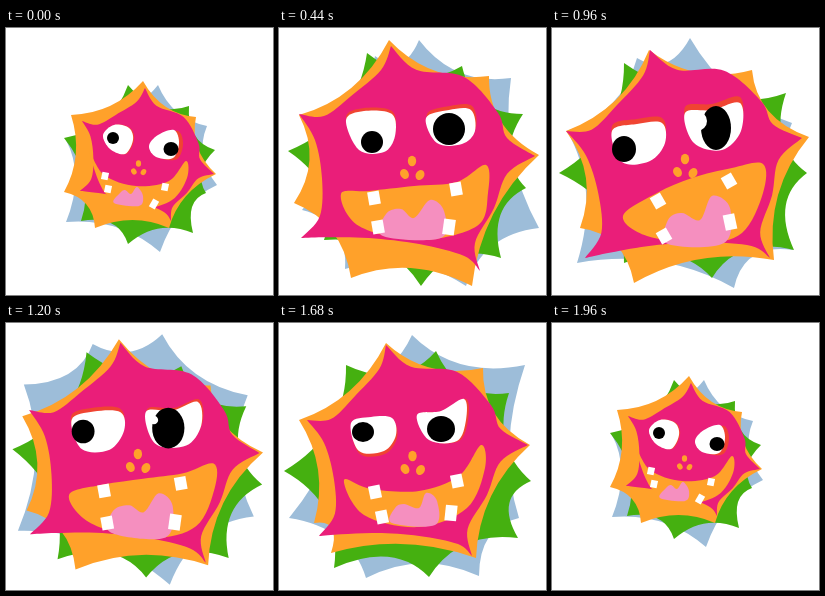
These frames come from a looping animation (267x267 px, 2 s). An HTML page:

```html
<!DOCTYPE html>
<html lang="en">
<head>
<meta charset="utf-8">
<title>Spiky monster</title>
<style>
  html, body { margin: 0; width: 100%; height: 100%; overflow: hidden; background: #fff; }
  svg { display: block; width: 100vw; height: 100vh; }
</style>
</head>
<body>
<svg id="stage" viewBox="0 0 267 267"></svg>
<script>
const LOOP = 2000, STEP = 40;
const RED = '#f04432', ORANGE = '#ffa12a', PINK = '#ea1e79';

// Spike tips run clockwise. pupil: x, y, rx, ry; glint: x, y, r; lids: two offsets;
// nose: x, y, size; teeth: four centres; bite: tooth size, tilt.
const small = {
  blue: [110,75, 152,57, 201,98, 211,157, 154,224, 60,194, 60,112],
  green: [122,57, 183,78, 209,122, 200,165, 187,205, 122,216, 75,193, 58,110],
  orange: [137,53, 190,89, 210,146, 163,200, 89,200, 58,164, 65,87],
  body: [139,60, 208,146, 165,193, 74,163, 76,93],
  eyeL: [97,107, 108,97, 123,100, 127,112, 119,126, 104,121],
  eyeR: [143,118, 152,107, 168,102, 173,115, 167,130, 150,129],
  pupilL: [107,110, 6,6], pupilR: [165,121, 7.5,7], glint: [160,118, 0], lids: [1,0, 4,1],
  nose: [132.5,141, .62], mouth: [83,122, 98,147, 130,158, 163,153, 180,133, 181,150, 166,172, 135,180, 100,166],
  teeth: [99,148, 159,159, 102,161, 148,176], bite: [7.5, 12],
  tongue: [108,175, 114,165, 119,162, 125,166, 131,159, 137,168, 133,178]
};
const laugh = {
  blue: [96,28, 140,12, 232,50, 260,200, 187,258, 66,241, 23,182],
  green: [88,25, 183,38, 244,86, 247,160, 222,230, 142,258, 45,212, 9,123],
  orange: [110,12, 210,48, 260,127, 193,258, 72,250, 15,175, 20,87],
  body: [112,18, 256,128, 201,243, 22,210, 20,86],
  eyeL: [67,92, 85,83, 113,86, 116,108, 105,124, 80,122],
  eyeR: [147,90, 170,82, 192,82, 196,103, 183,116, 158,115],
  pupilL: [93,114, 11,11], pupilR: [170,101, 16,16], glint: [155,97, 0], lids: [0,-3, 1,-4],
  nose: [133,142, 1], mouth: [62,166, 90,163, 135,158, 178,154, 207,137, 209,165, 198,198, 140,212, 80,198],
  teeth: [95,170, 177,161, 99,199, 170,199], bite: [13, -10],
  tongue: [104,208, 107,186, 122,181, 135,190, 151,172, 165,183, 162,210]
};
const scowl = {
  blue: [40,73, 162,15, 242,72, 240,180, 155,263, 10,195, 30,140],
  green: [105,22, 190,36, 247,98, 240,160, 206,244, 127,255, 50,212, 10,110],
  orange: [123,12, 215,70, 260,142, 193,255, 53,240, 12,151, 30,72],
  body: [128,16, 257,142, 190,248, 9,201, 25,72],
  eyeL: [69,84, 90,80, 119,85, 119,108, 105,123, 78,118],
  eyeR: [147,90, 172,92, 197,88, 200,105, 186,125, 156,121],
  pupilL: [88,112, 12,12], pupilR: [170,104, 14,20], glint: [154,97, 6], lids: [1,-4, 8,-5],
  nose: [131,141, 1], mouth: [58,167, 92,157, 140,154, 180,155, 208,153, 202,175, 190,208, 140,217, 80,200],
  teeth: [95,163, 172,164, 97,199, 161,205], bite: [13, 8],
  tongue: [97,210, 101,188, 118,182, 133,190, 146,173, 165,186, 158,218]
};
const growl = {
  blue: [85,30, 138,10, 240,95, 241,222, 182,260, 25,235, 15,103],
  green: [72,35, 160,50, 234,65, 255,145, 242,222, 160,250, 72,235, 7,145],
  orange: [97,22, 200,42, 257,109, 222,232, 82,255, 28,200, 14,103],
  body: [98,22, 250,110, 218,230, 33,230, 14,103],
  eyeL: [60,103, 85,96, 110,95, 113,115, 98,133, 70,134],
  eyeR: [133,85, 160,82, 188,75, 189,103, 170,122, 142,115],
  pupilL: [72,121, 12,13], pupilR: [164,100, 15,22], glint: [145,93, 10], lids: [0,-5, 0,-6],
  nose: [133,140, 1], mouth: [71,188, 105,165, 140,150, 180,140, 211,136, 211,165, 190,205, 150,215, 95,208],
  teeth: [106,173, 177,153, 112,208, 178,194], bite: [13, -30],
  tongue: [116,216, 116,192, 130,185, 148,192, 160,168, 178,180, 172,215]
};
const grin = {
  blue: [88,14, 170,12, 243,55, 253,172, 150,263, 2,187, 20,30],
  green: [87,25, 187,38, 245,97, 257,174, 208,245, 125,258, 36,237, 6,112],
  orange: [125,12, 208,78, 257,145, 187,250, 60,240, 15,178, 18,86],
  body: [127,18, 256,145, 186,247, 17,197, 30,75],
  eyeL: [70,92, 90,83, 118,85, 122,102, 108,122, 80,120],
  eyeR: [145,92, 172,92, 195,82, 200,102, 188,123, 155,125],
  pupilL: [81,99, 11,11], pupilR: [161,109, 17,19], glint: [150,100, 0], lids: [-1,-3, 2,0],
  nose: [131,140, 1], mouth: [57,160, 92,159, 135,160, 175,158, 205,144, 207,165, 190,202, 140,215, 78,195],
  teeth: [92,164, 173,166, 93,194, 162,203], bite: [13, 5],
  tongue: [97,205, 100,185, 118,180, 130,187, 147,172, 158,185, 150,214]
};
const smirk = {
  blue: [70,50, 133,12, 246,42, 240,195, 200,253, 87,255, 10,195],
  green: [67,42, 157,28, 230,70, 252,158, 239,215, 150,254, 55,245, 5,148],
  orange: [107,20, 204,45, 251,122, 197,235, 52,230, 35,200, 20,97],
  body: [107,22, 249,122, 193,233, 40,213, 28,97],
  eyeL: [72,100, 92,94, 113,95, 117,112, 105,128, 80,128],
  eyeR: [138,92, 162,88, 185,76, 187,97, 178,118, 150,117],
  pupilL: [84,109, 11,10], pupilR: [162,106, 14,13], glint: [150,100, 0], lids: [1,3, 2,0],
  nose: [133.5,142, 1], mouth: [65,157, 92,166, 140,168, 180,153, 202,122, 206,145, 188,185, 140,204, 85,192],
  teeth: [96,169, 178,158, 103,194, 172,190], bite: [13, -12],
  tongue: [113,200, 116,185, 125,181, 140,185, 147,170, 158,178, 156,202]
};

const smooth = u => u * u * (3 - 2 * u);
const easeOut = u => 1 - (1 - u) ** 2.5;
const easeIn = u => u ** 1.6;
const keys = [
  { at: 0, pose: small, ease: easeOut },
  { at: 440, pose: laugh, ease: smooth },
  { at: 680, pose: scowl, ease: smooth },
  { at: 960, pose: growl, ease: smooth },
  { at: 1400, pose: grin, ease: smooth },
  { at: 1680, pose: smirk, ease: easeIn },
  { at: 1960, pose: small, ease: smooth },
  { at: LOOP, pose: small }
];

// Inner outline of each body side: position along the side, outward bulge.
const sides = [
  [[.19, -.02], [.424, .109], [.694, .065], [.817, -.015]],
  [[.22, -.137], [.507, -.114], [.82, -.13]],
  [[.1, -.065], [.356, -.085], [.633, -.068], [.86, -.03]],
  [[.175, -.155], [.48, -.177], [.787, -.126]],
  [[.165, -.144], [.46, -.144], [.805, -.117]]
];

const stage = document.getElementById('stage');
function add(tag, fill) {
  const node = document.createElementNS('http://www.w3.org/2000/svg', tag);
  node.setAttribute('fill', fill);
  return stage.appendChild(node);
}
function set(node, attrs) {
  for (const name in attrs) node.setAttribute(name, attrs[name]);
}
const parts = {};
for (const [name, tag, fill] of [
  ['blue', 'path', '#9dbdd9'], ['green', 'path', '#45b010'], ['orange', 'path', ORANGE],
  ['body', 'path', PINK], ['lidL', 'path', RED], ['lidR', 'path', RED],
  ['eyeL', 'path', '#fff'], ['eyeR', 'path', '#fff'],
  ['pupilL', 'ellipse', '#000'], ['pupilR', 'ellipse', '#000'], ['glint', 'circle', '#fff'],
  ['mouth', 'path', ORANGE], ['tongue', 'path', '#f58fbf']
]) parts[name] = add(tag, fill);
const teeth = [0, 1, 2, 3].map(() => add('rect', '#fff'));
const nose = [[0, -9], [-7.5, 4], [8, 5]].map(offset => ({ offset, node: add('ellipse', ORANGE) }));

const pairs = list => list.reduce((out, x, i) => i % 2 ? out : [...out, [x, list[i + 1]]], []);
const fmt = p => p.map(n => n.toFixed(2)).join(' ');

// Cubic from b to c of a spline whose neighbours are a and d.
function segment(a, b, c, d) {
  const c1 = b.map((n, i) => n + (c[i] - a[i]) / 6);
  const c2 = c.map((n, i) => n - (d[i] - b[i]) / 6);
  return `C${fmt(c1)} ${fmt(c2)} ${fmt(c)}`;
}
function blob(list) {
  const p = pairs(list), n = p.length;
  return 'M' + fmt(p[0]) + p.map((q, i) =>
    segment(p[(i + n - 1) % n], q, p[(i + 1) % n], p[(i + 2) % n])).join('') + 'Z';
}
function spikes(list, pull) {
  const p = pairs(list), n = p.length;
  const centre = [0, 1].map(k => p.reduce((sum, q) => sum + q[k], 0) / n);
  return 'M' + fmt(p[0]) + p.map((q, i) => {
    const next = p[(i + 1) % n];
    const dip = q.map((v, k) => (v + next[k]) / 2 * (1 - pull) + centre[k] * pull);
    return `Q${fmt(dip)} ${fmt(next)}`;
  }).join('') + 'Z';
}
function bodyPath(list) {
  const tips = pairs(list);
  return 'M' + fmt(tips[0]) + tips.map((a, i) => {
    const b = tips[(i + 1) % tips.length], dx = b[0] - a[0], dy = b[1] - a[1];
    const line = [a, ...sides[i].map(([u, v]) =>
      [a[0] + dx * u + dy * v, a[1] + dy * u - dx * v]), b];
    return line.slice(1).map((q, k) =>
      segment(line[k - 1] || line[k], line[k], q, line[k + 2] || q)).join('');
  }).join('') + 'Z';
}

function poseAt(t) {
  const i = keys.findIndex((key, k) => t < keys[k + 1].at);
  const from = keys[i], to = keys[i + 1];
  const u = from.ease((t - from.at) / (to.at - from.at));
  const pose = {};
  for (const name in from.pose)
    pose[name] = from.pose[name].map((n, k) => n + (to.pose[name][k] - n) * u);
  return pose;
}

function draw(t) {
  const p = poseAt(t);
  for (const [name, pull] of [['blue', .25], ['green', .3], ['orange', .24]])
    set(parts[name], { d: spikes(p[name], pull) });
  set(parts.body, { d: bodyPath(p.body) });
  for (const name of ['eyeL', 'eyeR', 'mouth', 'tongue']) set(parts[name], { d: blob(p[name]) });
  ['L', 'R'].forEach((side, i) => {
    const [cx, cy, rx, ry] = p['pupil' + side];
    set(parts['pupil' + side], { cx, cy, rx, ry });
    set(parts['lid' + side], {
      d: blob(p['eye' + side]),
      transform: `translate(${p.lids[2 * i]} ${p.lids[2 * i + 1]})`
    });
  });
  const [cx, cy, r] = p.glint;
  set(parts.glint, { cx, cy, r });

  const [size, tilt] = p.bite;
  pairs(p.teeth).forEach(([x, y], i) => {
    const height = size * (i === 3 ? 1.2 : 1), width = size * .9;
    const turn = i === 3 ? tilt + 18 : tilt;
    set(teeth[i], {
      x: -width / 2, y: -height / 2, width, height,
      transform: `translate(${x} ${y}) rotate(${turn})`
    });
  });
  const [nx, ny, scale] = p.nose;
  for (const { offset: [dx, dy], node } of nose)
    set(node, {
      rx: 4.2 * scale, ry: 5.2 * scale,
      transform: `translate(${nx + dx * scale} ${ny + dy * scale}) rotate(${dx * 4})`
    });
}

const start = performance.now();
function tick() {
  const t = (performance.now() - start) % LOOP;
  draw(Math.floor(t / STEP) * STEP);
  requestAnimationFrame(tick);
}
tick();
</script>
</body>
</html>
```
